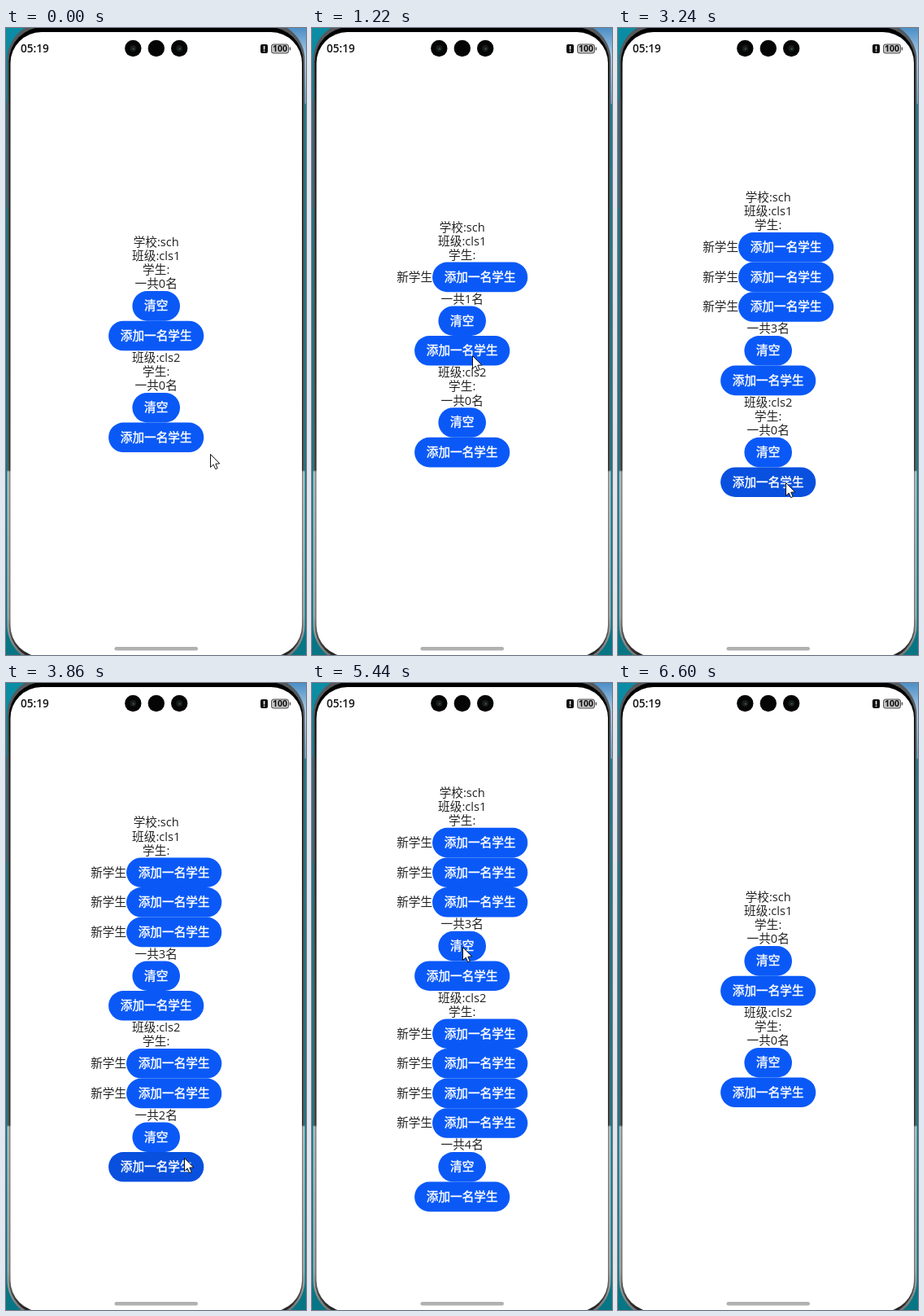
Write an HTML page with a canvas that moves like this. It is 369 by 770 pixels and loops after 6.92 s.

```html
<!DOCTYPE html>
<html lang="zh-CN">
<head>
<meta charset="utf-8">
<style>
html, body { margin: 0; width: 369px; height: 770px; overflow: hidden; }
canvas { display: block; }
</style>
</head>
<body>
<canvas id="stage" width="369" height="770"></canvas>
<script>
const ctx = document.getElementById('stage').getContext('2d');
const LOOP = 6920, CX = 184.7, MID = 387.7;
const LINE = 17.2, BTN = 36.6, EM = 14.65, DROP = 4.9;
const FONT = '"Open Sans", "Noto Sans CJK SC", "Noto Sans CJK", sans-serif';
const ADD = '添加一名学生', CLEAR = '清空';

// Pointer moves: start, end, steps, x, y
const START = [251, 523];
const MOVES = [
  [70, 210, 3, 168, 339],
  [360, 670, 5, 192, 390],
  [1150, 1220, 2, 197, 402],
  [1686, 2001, 5, 202, 294],
  [2700, 3010, 5, 206, 558],
  [3390, 3540, 3, 217, 596],
  [3860, 3860, 1, 219, 583],
  [4020, 4260, 4, 214, 595],
  [4660, 4820, 3, 212, 608],
  [5140, 5440, 5, 185, 324],
  [5920, 6147, 4, 190, 552],
  [6449, 6524, 2, 358, 756]
];
const HIDE = 6600;

// Changes: time, students in class 1 and class 2, pressed button
const EVENTS = [
  [0, 0, 0, ''],
  [820, 0, 0, 'add1'], [900, 1, 0, 'add1'], [990, 1, 0, ''],
  [1450, 1, 0, 'add1'], [1530, 2, 0, 'add1'], [1600, 2, 0, ''],
  [2080, 2, 0, 'row1-0'], [2150, 3, 0, ''],
  [3240, 3, 0, 'add2'], [3310, 3, 1, 'add2'], [3390, 3, 1, ''],
  [3860, 3, 2, 'add2'], [3940, 3, 2, ''],
  [4430, 3, 2, 'add2'], [4510, 3, 3, 'add2'], [4590, 3, 3, ''],
  [4990, 3, 3, 'add2'], [5070, 3, 4, 'add2'], [5140, 3, 4, ''],
  [5590, 3, 4, 'clear1'], [5670, 0, 4, 'clear1'], [5750, 0, 4, ''],
  [6222, 0, 4, 'clear2'], [6298, 0, 0, 'clear2'], [6373, 0, 0, '']
];

function box(x, y, w, h, r, fill) {
  ctx.beginPath();
  ctx.roundRect(x, y, w, h, r);
  ctx.fillStyle = fill;
  ctx.fill();
}

function disc(x, y, r, fill) {
  box(x - r, y - r, 2 * r, 2 * r, r, fill);
}

function text(str, x, y, { size = EM, weight = 400, fill = '#222', align = 'center', bolden = 0 } = {}) {
  ctx.font = `${weight} ${size}px ${FONT}`;
  ctx.textAlign = align;
  ctx.fillStyle = ctx.strokeStyle = fill;
  ctx.fillText(str, x, y);
  if (bolden) {
    ctx.lineWidth = bolden;
    ctx.strokeText(str, x, y);
  }
}

function shade(...stops) {
  const g = ctx.createLinearGradient(0, 0, 0, 770);
  stops.forEach(([at, color]) => g.addColorStop(at / 770, color));
  return g;
}

function drawPhone() {
  box(0, 0, 369, 770, 0, shade([0, '#0b8da5'], [220, '#087f91'], [770, '#087584']));
  box(345, 0, 24, 93, 0, shade([0, '#4c8fc6'], [40, '#b9d4ea'], [93, '#6fa9d0']));
  box(0, 90, 2, 130, 0, '#376b83');
  box(1.5, -7, 366, 787, 46, shade([0, '#55595c'], [543, '#5c6265'], [545, '#c3c7c8'], [720, '#b0b3b4'], [770, '#777']));
  box(3.5, -1, 362, 777, 42, shade([0, '#000'], [110, '#1b1b1b'], [543, '#333'], [545, '#85898a'], [725, '#777'], [770, '#222']));
  box(5.5, 5, 358.5, 767, 38, '#fff');
  box(133.5, 760, 102.5, 4.5, 2.2, '#b1b1b1');
}

function drawStatus() {
  text('05:19', 18, 29.6, { size: 13.6, weight: 600, fill: '#111', align: 'left' });
  [156.3, 184.8, 213.2].forEach((x, i) => {
    disc(x, 25, 10.2, '#050505');
    if (i === 1) return;
    disc(x, 25, 4, '#171b1c');
    disc(x + 0.5, 25.5, 1.5, '#354341');
  });
  box(313, 20, 9, 11, 2, '#111');
  box(316.8, 22, 1.5, 4.5, 0.5, '#fff');
  box(316.8, 27.5, 1.5, 1.5, 0.5, '#fff');
  box(326, 19.5, 22, 12, 3.5, '#555');
  box(327, 20.5, 20, 10, 2.5, '#c4c4c4');
  box(348.7, 23.5, 1.5, 4, 0.7, '#555');
  text('100', 337, 29.3, { size: 10.5, weight: 700, fill: '#111' });
}

function button(label, left, top, pressed) {
  box(left, top, (label.length + 2) * EM, BTN, BTN / 2, pressed ? '#0950de' : '#0a59f7');
  text(label, left + EM, top + BTN / 2 + DROP, { fill: '#fff', align: 'left', bolden: 0.4 });
}

function drawList(counts, pressed) {
  const rows = counts[0] + counts[1];
  let y = MID - (7 * LINE + (4 + rows) * BTN) / 2;
  const line = str => {
    text(str, CX, y + LINE / 2 + DROP);
    y += LINE;
  };
  const centered = (label, id) => {
    button(label, CX - (label.length + 2) * EM / 2, y, pressed === id);
    y += BTN;
  };
  line('学校:sch');
  counts.forEach((count, i) => {
    const n = i + 1;
    line('班级:cls' + n);
    line('学生:');
    for (let k = 0; k < count; k++) {
      const left = CX - 5.5 * EM;
      text('新学生', left, y + BTN / 2 + DROP, { align: 'left' });
      button(ADD, left + 3 * EM, y, pressed === `row${n}-${k}`);
      y += BTN;
    }
    line(`一共${count}名`);
    centered(CLEAR, 'clear' + n);
    centered(ADD, 'add' + n);
  });
}

// The pointer advances in discrete steps within each move
function pointerAt(t) {
  let [x, y] = START;
  for (const [from, to, steps, tx, ty] of MOVES) {
    if (t < from) break;
    const gap = (to - from) / (steps - 1 || 1);
    const done = t >= to ? 1 : (Math.floor((t - from) / gap) + 1) / steps;
    x += (tx - x) * done;
    y += (ty - y) * done;
  }
  return [x, y];
}

function drawPointer(x, y) {
  ctx.save();
  ctx.translate(Math.round(x) + 0.5, Math.round(y) + 0.5);
  ctx.beginPath();
  [[0, 0], [0, 16], [3.7, 12.6], [6.2, 18.2], [8.7, 17.1], [6.3, 11.7], [11.3, 11.4]]
    .forEach(p => ctx.lineTo(...p));
  ctx.closePath();
  ctx.fillStyle = '#fff';
  ctx.fill();
  ctx.strokeStyle = '#111';
  ctx.lineWidth = 1;
  ctx.stroke();
  ctx.restore();
}

function draw(now) {
  const t = now % LOOP;
  const [, first, second, pressed] = EVENTS.findLast(e => e[0] <= t);
  drawPhone();
  drawStatus();
  drawList([first, second], pressed);
  if (t < HIDE) drawPointer(...pointerAt(t));
}

const begin = performance.now();
function tick() {
  draw(performance.now() - begin);
  requestAnimationFrame(tick);
}
tick();
</script>
</body>
</html>
```
